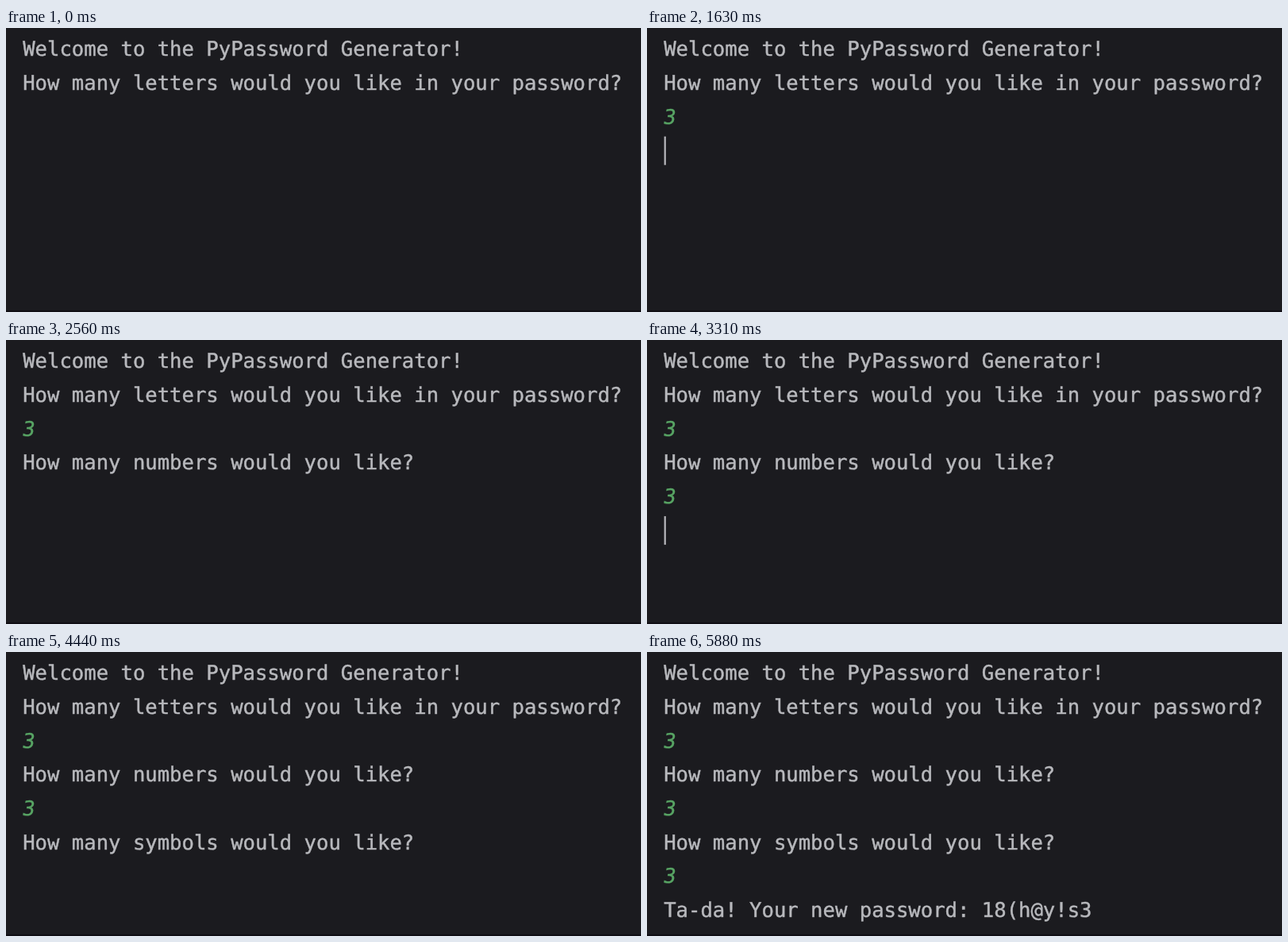
An HTML page for the animation above (7750 ms loop, 800x358 px).

```html
<!DOCTYPE html>
<html lang="en">
<head>
<meta charset="utf-8">
<title>Password generator</title>
<style>
  html, body { margin: 0; width: 100%; height: 100%; overflow: hidden; background: #1b1b1f; }
  svg { display: block; width: 800px; height: 358px; }
  text {
    font: 25.6px "DejaVu Sans Mono", monospace;
    fill: #b8b9bd;
    stroke: #b8b9bd;
    stroke-width: 0.45;
    text-rendering: geometricPrecision;
    font-variant-ligatures: none;
  }
  .answer { fill: #58a564; stroke: #58a564; }
</style>
</head>
<body>
<svg id="stage" viewBox="0 0 800 358">
  <rect width="800" height="358" fill="#1b1b1f"/>
  <rect y="356" width="800" height="2" fill="#100e14"/>
  <rect id="cursor" width="2.2" height="36" fill="#b8b9bd"/>
</svg>
<script>
const LOOP = 7750, LEFT = 21.2, PITCH = 15.41, ROW = 42.7, BASE = 35.1;
const stage = document.getElementById("stage");
const cursor = document.getElementById("cursor");

// [text, time it appears, typed by the user]
const lines = [
  ["Welcome to the PyPassword Generator!", 0],
  ["How many letters would you like in your password?", 0],
  ["3", 630, true],
  ["How many numbers would you like?", 1880],
  ["3", 3000, true],
  ["How many symbols would you like?", 3560],
  ["3", 5000, true],
  ["Ta-da! Your new password: 18(h@y!s3", 5560]
];

// [from, to, row, column]
const cursorSpans = [
  [60, 630, 2, 0], [630, 1310, 2, 1],
  [1630, 1880, 3, 0], [1880, 2560, 4, 0],
  [3000, 3310, 4, 1], [3310, 3560, 5, 0],
  [3560, 4440, 6, 0], [5000, 5310, 6, 1],
  [5310, 5560, 7, 0]
];

const nodes = lines.map(([str, , typed], row) => {
  const el = document.createElementNS("http://www.w3.org/2000/svg", "text");
  const x = typed ? LEFT - 1.4 : LEFT;
  const slant = typed ? " skewX(-9)" : "";
  el.setAttribute("transform", `translate(${x} ${BASE + row * ROW})${slant}`);
  if (typed) el.setAttribute("class", "answer");
  el.textContent = str;
  stage.insertBefore(el, cursor);
  return el;
});

function show(el, on) {
  el.setAttribute("visibility", on ? "visible" : "hidden");
}

function draw(t) {
  nodes.forEach((el, i) => show(el, t >= lines[i][1]));
  const span = cursorSpans.find(([from, to]) => t >= from && t < to);
  show(cursor, span);
  if (span) {
    cursor.setAttribute("x", LEFT + 0.4 + span[3] * PITCH);
    cursor.setAttribute("y", 94 + (span[2] - 2) * ROW);
  }
}

const start = performance.now();
function tick() {
  draw((performance.now() - start) % LOOP);
  requestAnimationFrame(tick);
}
draw(0);
requestAnimationFrame(tick);
</script>
</body>
</html>
```
